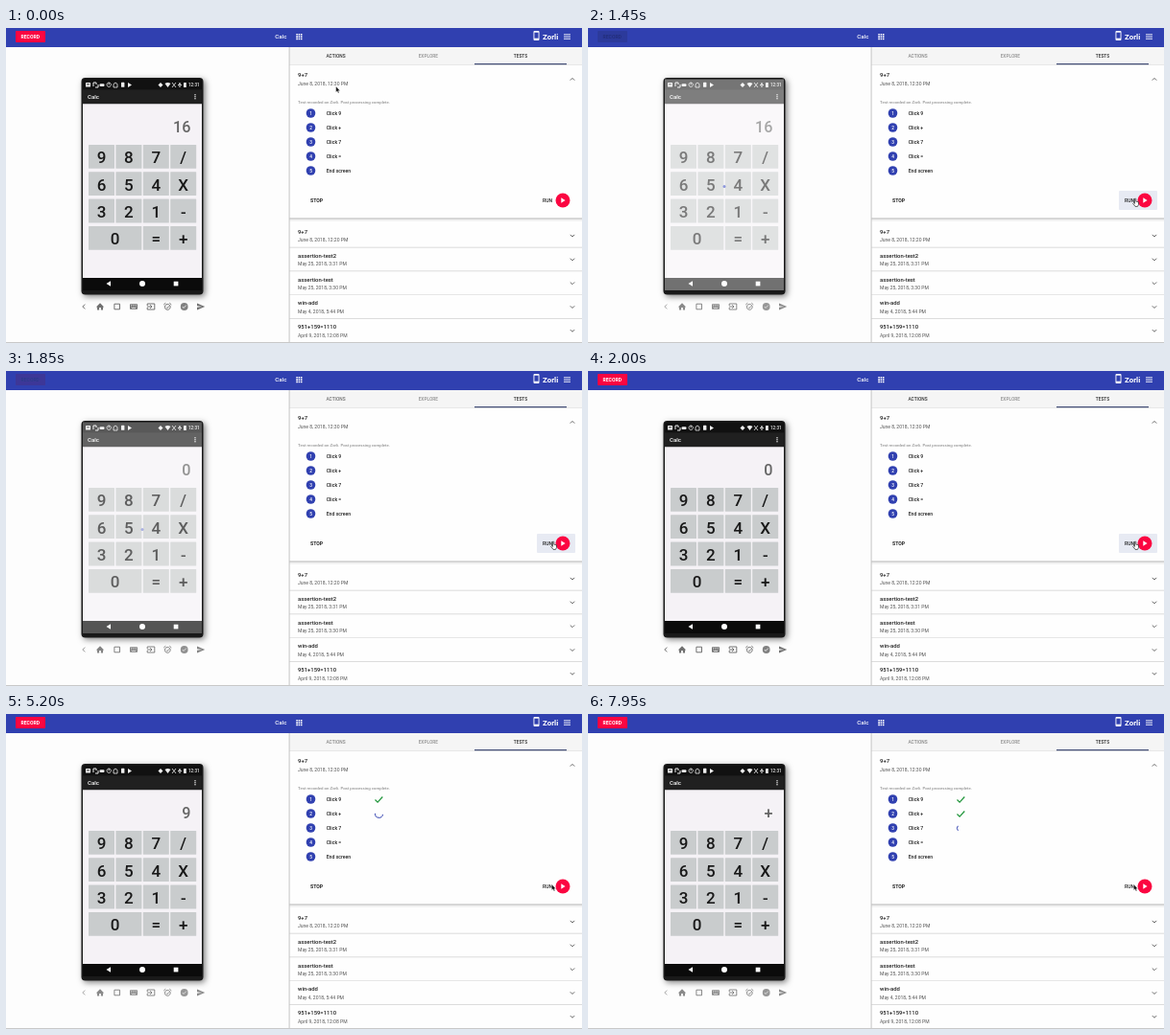
An HTML page with a canvas that plays this animation: 600 px wide and 329 px high, repeating every 8 s.

```html
<!DOCTYPE html>
<html lang="en">
<head>
<meta charset="utf-8">
<style>
html, body { margin: 0; width: 100%; height: 100%; overflow: hidden; background: #fdfdfd; }
canvas { display: block; width: 600px; height: 329px; }
</style>
</head>
<body>
<canvas width="600" height="329"></canvas>
<script>
const canvas = document.querySelector('canvas');
const c = canvas.getContext('2d');
const BLUE = '#3040b0', RED = '#fb0641', INK = '#202020', GREY = '#707070';
const TAU = Math.PI * 2;

const clamp = v => Math.max(0, Math.min(1, v));
const ramp = (t, a, b) => clamp((t - a) / (b - a));
const ease = v => v * v * (3 - 2 * v);
const mix = (a, b, v) => a + (b - a) * v;

function rect(x, y, w, h, fill, r = 0) {
  c.fillStyle = fill;
  c.beginPath();
  c.roundRect(x, y, w, h, r);
  c.fill();
}
function disc(x, y, r, fill) {
  c.fillStyle = fill;
  c.beginPath();
  c.arc(x, y, r, 0, TAU);
  c.fill();
}
function path(d, x, y, { stroke, fill, width = 1 }) {
  const p = new Path2D(d);
  c.save();
  c.translate(x, y);
  if (fill) { c.fillStyle = fill; c.fill(p); }
  if (stroke) { c.strokeStyle = stroke; c.lineWidth = width; c.stroke(p); }
  c.restore();
}
// y is the middle of the capitals
function text(s, x, y, size, fill = INK, weight = 400, align = 'left') {
  c.font = `${weight} ${size}px Roboto, sans-serif`;
  c.textAlign = align;
  c.fillStyle = fill;
  c.fillText(s, x, y + size * 0.355);
}
function faded(alpha, draw) {
  if (alpha <= 0) return;
  c.save();
  c.globalAlpha = alpha;
  draw();
  c.restore();
}

function topBar(busy) {
  rect(0, 0, 600, 20, BLUE);
  rect(10, 3, 31, 12, RED, 1);
  text('RECORD', 25.2, 9, 5.1, '#fff', 700, 'center');
  faded(busy, () => {
    rect(9, 2, 33, 14, BLUE);
    rect(10, 3, 31, 12, '#2c3a9b', 1);
    text('RECORD', 25.2, 9, 5.1, '#222d78', 500, 'center');
  });
  text('Calc', 280.3, 9, 6.1, '#fff', 500);
  for (let i = 0; i < 9; i++)
    rect(302.3 + i % 3 * 2.3, 6 + Math.floor(i / 3) * 2.3, 1.6, 1.6, '#fff');
  rect(549.5, 3, 6, 10, '#fff', 1);
  rect(550.4, 4.7, 4.2, 6, BLUE);
  text('Zorli', 559, 9.3, 7.9, '#fff', 700);
  for (let i = 0; i < 3; i++) rect(581, 6.4 + i * 2.2, 7, 0.9, '#fff');
}

function spinner(y, age) {
  const turn = Math.floor(age / 1000), phase = age % 1000 / 500;
  const grow = ease(clamp(phase)), shrink = ease(clamp(phase - 1));
  const base = 220 - 90 + age * 0.256 + turn * 270;
  c.strokeStyle = BLUE;
  c.lineWidth = 1;
  c.beginPath();
  c.arc(388.5, y, 4, (base + shrink * 270) * TAU / 360, (base + 18 + grow * 270) * TAU / 360);
  c.stroke();
}

function tests(t, quiet, hover) {
  rect(295, 20, 305, 309, '#fefefe');
  rect(295, 20, 305, 18, '#f5f5f5');
  rect(295, 38, 305, 0.6, '#d4d4d4');
  text('ACTIONS', 343.5, 29.5, 4.8, `rgba(30,30,30,${mix(0.9, 0.5, quiet)})`, 500, 'center');
  text('EXPLORE', 439.8, 29.5, 4.8, '#919191', 500, 'center');
  text('TESTS', 536, 29.5, 4.8, '#303030', 500, 'center');
  rect(488, 37, 96, 1.2, '#465078');

  text('9+7', 304, 49, 6, INK, 500);
  text('June 8, 2018, 12:30 PM', 304, 58, 5.05, '#555');
  text('Test recorded on Zorli. Post processing complete.', 304, 77, 4.35, '#777');
  path('M-2.2 1.1L0-1.1 2.2 1.1', 590, 53.5, { stroke: '#555', width: 0.9 });

  ['Click 9', 'Click +', 'Click 7', 'Click =', 'End screen'].forEach((label, i) => {
    const y = 89 + i * 15;
    disc(317.5, y, 4.8, BLUE);
    text(i + 1, 317.5, y, 4.8, '#fff', 500, 'center');
    text(label, 333.7, y + 0.5, 5.15, INK, 500);
  });
  const starts = [3400, 3920, 5800, Infinity];
  for (let i = 0; i < 3; i++) {
    const y = 89.3 + i * 15;
    if (t >= starts[i + 1])
      path('M-3.8.2L-1.2 2.8 4-2.8', 388.3, y, { stroke: '#21963b', width: 1.3 });
    else if (t >= starts[i]) spinner(y, t - starts[i]);
  }

  text('STOP', 317, 180, 5.1, INK, 700);
  faded(hover, () => rect(553, 170, 40, 20, '#e7eaf3', 1));
  text('RUN', 559, 180, 5.05, INK, 500);
  disc(580, 180, 7.5, RED);
  path('M-1.7-2.8L2.6 0-1.7 2.8z', 580, 180, { fill: '#fff' });

  rect(295, 198.5, 305, 1.2, '#b8b8b8');
  rect(295, 199.7, 305, 2, '#f0f0f0');
  [['9+7', 'June 8, 2018, 12:20 PM'], ['assertion-test2', 'May 25, 2018, 3:31 PM'],
   ['assertion-test', 'May 25, 2018, 3:30 PM'], ['win-add', 'May 4, 2018, 5:44 PM'],
   ['951+159=1110', 'April 9, 2018, 12:08 PM']].forEach(([name, date], i) => {
    const y = 213 + i * 24.8;
    text(name, 304, y, 5.9, INK, 500);
    text(date, 304, y + 8.7, 5.05, '#555');
    path('M-2.2-1.1L0 1.1 2.2-1.1', 590, y + 4, { stroke: '#555', width: 0.9 });
    rect(295, y + 15.8, 305, 0.7, '#d0d0d0');
  });
  rect(294.6, 20, 1, 309, '#c4c4c4');
}

function statusBar() {
  const w = '#eee';
  rect(83, 57, 5, 4.5, w, 0.5);
  rect(84, 58.3, 3, 1, '#333');
  path('M0 4V0H3V2M2 5H5V2', 91, 57, { stroke: w });
  rect(97.5, 58.2, 5, 2.8, w, 1);
  path('M0 2.2A2.2 2.2 0 1 1 0 2.3M2.2 0V2.5', 105, 57, { stroke: w, width: 0.8 });
  path('M0 5V1.5L2 0 4 1.5V5z', 112, 57, { stroke: w, width: 0.8 });
  rect(120, 56.8, 3.4, 5, w, 0.6);
  path('M0 0L4 2.5 0 5z', 127, 57, { fill: w });
  path('M0 2.5L2.5 0 5 2.5 2.5 5z', 158.5, 57, { fill: w });
  path('M0 1Q3-1 6 1L3 5z', 165.5, 57, { fill: w });
  path('M0 0L4 5M4 0L0 5', 173, 57, { stroke: w, width: 0.8 });
  path('M2 0V5M0 3L2 1.5 4 3', 179, 57, { stroke: w });
  rect(185, 57, 2.8, 5, w, 0.5);
  text('12:31', 190, 59.5, 4.6, w, 500);
}

function navBar(fill) {
  rect(80, 261, 124, 13, fill);
  path('M2 -2.7V2.7L-2.5 0z', 107, 267, { fill: '#fff' });
  disc(142, 267, 3, '#fff');
  rect(174.7, 264.7, 4.7, 4.7, '#fff');
}

function calculator(t) {
  rect(80, 53.5, 124, 11, '#111');
  statusBar();
  rect(80, 64.5, 124, 14.8, '#202020');
  text('Calc', 85, 72, 6, '#fff', 500);
  for (let i = 0; i < 3; i++) disc(197, 69.7 + i * 2, 0.7, '#fff');
  rect(80, 79.3, 124, 181.7, '#f5f2f6');
  const shown = t < 1850 ? '16' : t < 3900 ? '0' : t < 5850 ? '9' : '+';
  text(shown, 192.5, 103, 16.2, '#666', 500, 'right');

  const pressed = t > 3650 && t < 3900 ? '9' : t > 5850 && t < 6050 ? '+' : '';
  ['987/', '654X', '321-', '0 =+'].forEach((row, j) => [...row].forEach((key, i) => {
    if (key === ' ') return;
    const x = 86 + i * 28.4, y = 122 + j * 28.3, w = key === '0' ? 55.3 : 27;
    rect(x, y, w, 24.8, key === pressed ? '#aeb2b4' : '#c9cccd', 0.5);
    text(key, x + w / 2, y + 13.2, 17, '#191919', 500, 'center');
  }));
  navBar('#0b0b0b');
}

function photoText(s, x, y, size, fill) {
  c.save();
  c.translate(x, y);
  c.rotate(-0.04);
  text(s, 0, 0, size, fill, 700);
  c.restore();
}

function weddingScreen() {
  c.save();
  c.beginPath();
  c.rect(80, 53.5, 124, 220.5);
  c.clip();
  const g = c.createLinearGradient(80, 54, 150, 262);
  g.addColorStop(0, '#8d8d8d');
  g.addColorStop(0.5, '#999');
  g.addColorStop(1, '#858585');
  rect(80, 53.5, 124, 208, g);
  path('M0 0L124-8V62L0 80z', 80, 72, { fill: '#959595' });
  path('M0 0L70-10V32L8 44z', 134, 146, { fill: '#a5a5a5' });
  path('M0 6Q18-5 34 0L31 12Q14 8 4 19z', 83, 145, { fill: '#65a076' });
  path('M0 8Q14-4 28 2T54 0', 142, 160, { stroke: '#bcbcbc', width: 2 });
  photoText('Zuv', 92, 81, 14, '#686868');
  photoText('now', 130, 83, 12, '#777');
  photoText('More moments', 89, 103, 14.5, '#6d6d6d');
  photoText("Elda's wedding", 87, 118, 14.5, '#6b6b6b');
  photoText('ions', 94, 183, 11, '#a9a9a9');
  photoText('Calendar', 139, 184, 11, '#aaa');
  rect(80, 53.5, 124, 11, '#686868');
  statusBar();
  disc(142, 99, 12, '#e7e7e7');
  text('Your entire wedding in one place', 142, 128, 5.8, '#c8c8c8', 400, 'center');
  rect(88, 202, 109, 13.5, '#c4c4c4', 6.7);
  rect(88, 220, 109, 13.5, '#bcbcbc', 6.7);
  rect(88, 238, 109, 13.5, '#717171', 6.7);
  text('New guest to a Zuv Wedding', 142, 208.7, 4, '#eee', 500, 'center');
  text("I'm getting married", 142, 226.7, 4, '#eee', 500, 'center');
  text('Already have an account?', 106, 244.8, 4, '#bbb');
  text('Log in', 159, 244.8, 4, '#f5f5f5', 700);
  navBar('#555');
  c.restore();
}

function phone(t, busy, photo) {
  c.save();
  c.shadowColor = 'rgba(0,0,0,.5)';
  c.shadowBlur = 6;
  c.shadowOffsetX = c.shadowOffsetY = 2;
  rect(78.5, 52, 127, 226.5, '#191919', 4);
  c.restore();
  calculator(t);
  faded(busy * 0.42, () => rect(80, 53.5, 124, 220.5, '#fff'));
  faded(busy * (1 - photo), () => disc(142, 165.5, 1.5, '#8d97dc'));
  faded(photo, weddingScreen);
}

function tools(quiet) {
  const style = { stroke: GREY, width: 1 }, solid = { fill: GREY };
  faded(mix(1, 0.82, quiet), () => {
    faded(mix(1, 0.6, quiet), () => path('M1.2-2.4L-1.2 0 1.2 2.4', 81, 291, style));
    path('M-4.2.4L0-3.8 4.2.4H3V3.6H.9V1H-.9V3.6H-3V.4z', 98, 291, solid);
    path('M-2.8-2.8H2.8V2.8H-2.8z', 115.7, 291, style);
    rect(129, 288.3, 8, 5.4, GREY, 0.6);
    for (let i = 0; i < 8; i++)
      rect(130 + i % 4 * 1.7, 289.3 + (i >> 2) * 1.5, 0.8, 0.8, '#fff');
    rect(131, 292.4, 4, 0.6, '#fff');
    path('M-3.8-1V-3H3.8V3H-3.8V1M-4 0H1M-.8-1.7L1 0-.8 1.7', 151, 291, style);
    path('M-2.9.3A2.9 2.9 0 1 1-2.9.4M-4-2L-2-3.8M4-2L2-3.8M-1.3.5L-.2 1.6 1.6-.6', 168.3, 291, style);
    disc(185.7, 291, 3.9, '#808080');
    path('M-1.9 0L-.6 1.4 2-1.4', 185.7, 291, { stroke: '#fff', width: 0.8 });
    path('M-4-3.5L4.2 0-4 3.5V.8L1.5 0-4-.8z', 203, 291, solid);
  });
}

function cursor(t) {
  const go = ease(ramp(t, 200, 700)), up = ease(ramp(t, 900, 1000));
  const x = mix(mix(343.7, 577, go), 568.5, up), y = mix(mix(61, 189, go), 178, up);
  if (t > 950 && t < 3350)
    path('M1-.2Q2-.8 2.3.3V2.8L5 3.4V6L4 8H1.5L-.8 4.8 0 4 1 5z', x, y + 0.4,
      { fill: '#fff', stroke: '#222', width: 0.7 });
  else
    path('M0 0V6L1.4 4.8 2.3 7 3.3 6.6 2.4 4.4H4.2z', x, y,
      { fill: '#111', stroke: '#fff', width: 0.3 });
}

function draw(now) {
  const t = now % 8000;
  const busy = ramp(t, 1100, 1300) * (1 - ramp(t, 1800, 1980));
  const photo = ramp(t, 1540, 1640) * (1 - ramp(t, 1750, 1850));
  const quiet = Math.max(busy, ramp(t, 3300, 3450));
  const hover = ramp(t, 900, 1000) * (1 - ramp(t, 3300, 3450));
  rect(0, 0, 600, 329, '#fdfdfd');
  tests(t, quiet, hover);
  topBar(busy);
  phone(t, busy, photo);
  tools(quiet);
  rect(0, 328, 600, 1, '#c8c8c8');
  cursor(t);
}

const start = performance.now();
function tick() {
  draw(performance.now() - start);
  requestAnimationFrame(tick);
}
tick();
</script>
</body>
</html>
```
